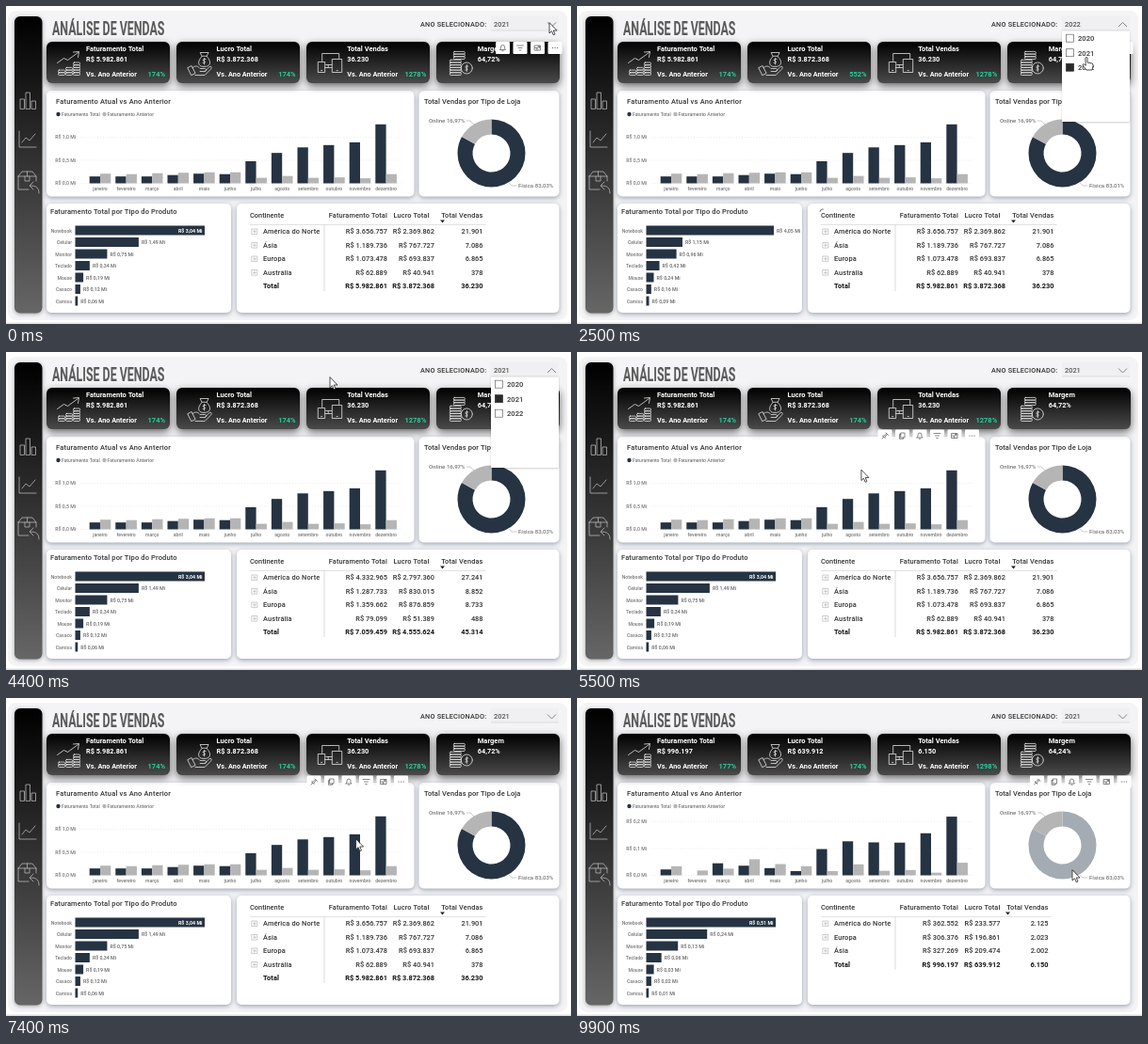
An HTML page with a canvas that plays this animation: 600 px wide and 338 px high, repeating every 10000 ms.

```html
<!DOCTYPE html>
<html lang="pt">
<head>
<meta charset="utf-8">
<title>Análise de Vendas</title>
<style>
html, body { margin: 0; width: 100%; height: 100%; overflow: hidden; background: #fff; }
canvas { display: block; width: 600px; height: 338px; }
</style>
</head>
<body>
<canvas id="stage"></canvas>
<script>
const canvas = document.getElementById('stage');
const ctx = canvas.getContext('2d');
const dpr = window.devicePixelRatio || 1;
canvas.width = 600 * dpr;
canvas.height = 338 * dpr;

const LOOP = 10000, STEP = 100;
const NAVY = '#263342', GRAY = '#b5b5b5', INK = '#333', SOFT = '#777', GREEN = '#22cf9a';
const MONTHS = ['janeiro', 'fevereiro', 'março', 'abril', 'maio', 'junho', 'julho', 'agosto',
  'setembro', 'outubro', 'novembro', 'dezembro'];
const PRODUCTS = ['Notebook', 'Celular', 'Monitor', 'Teclado', 'Mouse', 'Casaco', 'Camisa'];

const y2021 = {
  year: '2021',
  cards: ['R$ 5.982.861', 'R$ 3.872.368', '36.230', '64,72%'],
  growth: ['174%', '174%', '1278%'],
  bars: [.15, .15, .15, .18, .21, .2, .48, .66, .78, .83, .89, 1.28],
  prev: [.21, .2, .22, .23, .24, .24, .12, .16, .12, .13, .11, .2],
  unit: 49, tick: .5, ticks: 3,
  products: [3.04, 1.49, .75, .34, .19, .12, .06], reach: 137.5,
  share: [16.97, 83.03],
  cols: [405, 455, 506.5],
  rows: [
    ['América do Norte', 'R$ 3.656.757', 'R$ 2.369.862', '21.901'],
    ['Ásia', 'R$ 1.189.736', 'R$ 767.727', '7.086'],
    ['Europa', 'R$ 1.073.478', 'R$ 693.837', '6.865'],
    ['Austrália', 'R$ 62.889', 'R$ 40.941', '378'],
    ['Total', 'R$ 5.982.861', 'R$ 3.872.368', '36.230']]
};
const y2022 = {
  year: '2022',
  cards: ['R$ 7.059.459', 'R$ 4.555.624', '45.314', '64,53%'],
  growth: ['552%', '552%', '1415%'],
  bars: [.95, 1, 1.05, 1.15, 1.4, 1.5],
  prev: y2021.bars.slice(0, 6),
  unit: 42, tick: .5, ticks: 4,
  products: [4.05, 1.15, .96, .42, .24, .16, .09], reach: 135.5,
  share: [16.99, 83.01],
  cols: y2021.cols,
  rows: [
    ['América do Norte', 'R$ 4.332.965', 'R$ 2.797.360', '27.241'],
    ['Ásia', 'R$ 1.287.733', 'R$ 830.015', '8.852'],
    ['Europa', 'R$ 1.359.662', 'R$ 876.859', '8.733'],
    ['Austrália', 'R$ 79.099', 'R$ 51.389', '488'],
    ['Total', 'R$ 7.059.459', 'R$ 4.555.624', '45.314']]
};
const online = {
  year: '2021',
  cards: ['R$ 996.197', 'R$ 639.912', '6.150', '64,24%'],
  growth: ['177%', '174%', '1298%'],
  bars: [.022, 0, .045, .036, .027, .016, .098, .127, .123, .122, .157, .219],
  prev: [.034, .018, .025, .06, .042, .034, .016, .041, .017, .02, .01, .047],
  unit: 285, tick: .1, ticks: 3,
  products: [.51, .24, .125, .06, .03, .02, .01], reach: 137.5,
  share: y2021.share,
  cols: [405, 449.5, 500.5],
  rows: [
    ['América do Norte', 'R$ 362.552', 'R$ 233.577', '2.125'],
    ['Europa', 'R$ 306.376', 'R$ 196.861', '2.023'],
    ['Ásia', 'R$ 327.269', 'R$ 209.474', '2.002'],
    ['Total', 'R$ 996.197', 'R$ 639.912', '6.150']]
};

// Pointer stops: time, x, y
const POINTER = [
  [0, 577, 18], [300, 577, 18], [800, 545, 51], [1500, 543, 52], [1900, 540, 64], [2100, 540, 64],
  [2500, 541, 55], [3400, 541, 55], [3600, 541, 49], [3900, 541, 49], [4300, 344, 27],
  [4800, 344, 27], [5600, 300, 130], [6400, 273, 170], [7100, 273, 170], [7700, 470, 130],
  [8100, 500, 142], [9000, 500, 142], [9600, 526, 183], [10000, 526, 183]];

const comma = (n, d) => n.toFixed(d).replace('.', ',');

function text(s, x, y, size, o = {}) {
  ctx.font = `${o.weight || 500} ${size}px Roboto, sans-serif`;
  ctx.letterSpacing = (o.gap || 0) + 'px';
  ctx.textAlign = o.align || 'left';
  ctx.fillStyle = o.color || INK;
  ctx.fillText(s, x, y);
}

function box(x, y, w, h, r, fill, shadow) {
  ctx.save();
  if (shadow) {
    ctx.shadowColor = shadow.color;
    ctx.shadowBlur = shadow.blur * dpr;
    ctx.shadowOffsetY = shadow.dy * dpr;
  }
  ctx.fillStyle = fill;
  ctx.beginPath();
  ctx.roundRect(x, y, w, h, r);
  ctx.fill();
  ctx.restore();
}

function line(points, color, width = .7) {
  ctx.beginPath();
  points.forEach(p => ctx.lineTo(p[0], p[1]));
  ctx.strokeStyle = color;
  ctx.lineWidth = width;
  ctx.stroke();
}

function icon(d, x, y, color, width, fill) {
  ctx.save();
  ctx.translate(x, y);
  ctx.lineJoin = ctx.lineCap = 'round';
  const p = new Path2D(d);
  if (fill) { ctx.fillStyle = fill; ctx.fill(p); }
  ctx.strokeStyle = color;
  ctx.lineWidth = width;
  ctx.stroke(p);
  ctx.restore();
}

function fade(y0, y1, top, bottom) {
  const g = ctx.createLinearGradient(0, y0, 0, y1);
  g.addColorStop(0, top);
  g.addColorStop(1, bottom);
  return g;
}

// A pile of n coins standing on y
const pile = (x, y, w, n) => Array.from({ length: n }, (_, i) => {
  const top = y - 2.7 * (i + 1);
  return `M${x + 1} ${top}h${w - 2}q1 0 1 1v.7q0 1-1 1h${2 - w}q-1 0-1-1v-.7q0-1 1-1z`;
}).join('');

const SIDE_ICONS = [
  ['M1 18V8h4.500v10zM7 18V1h4.500v17zM13 18V10h4.500v8z', 14, 91],
  ['M0 0v17h18M3 12l4-5 4 3 6-7', 14, 133],
  ['M0 5l4-5h11l4 5v5M0 5v14h11M0 5h19M9.500 0v5M7 5v5h5v-5M22 23c0-6-3-8-9-8M16 11l-4 4 4 4', 13, 176]];
const CARD_ICONS = [
  'M0 13l7-5 4 2L22 2M17 1.500L23 1l-1 6' + pile(1, 26, 7, 2) + pile(9, 26, 7, 3) + pile(17, 26, 7, 5),
  'M15 6c-5 5-5 11 2 11s9-5 3-11zM15 6l-2-4h9l-2 4M19 9c-3-1-4 1.500-2 2s2 2.500-1 2M17.500 8v6.500M0 18l4-2 4 8-4 2zM5 18c4-3 6-1 8 1h5c2 0 2 3 0 3h-5M18 22l5-5c2-1 3 1 1 3l-6 6H8',
  'M4 11V3h18v5M7 18h7M10.500 15v3M8 15h6M0 12h7v11H0zM3 21h1M15 9h10v14H15zM19.500 21h1',
  pile(1, 26, 12, 6) + pile(5, 9, 12, 3) + 'M25 18.500a6 6 0 1 1-12 0a6 6 0 1 1 12 0M20.500 16.500c-3-1-4 1.500-2 2s2 2.500-1 2M19 15v7'];
const TOOLS = {
  pin: 'M1-3L3.500-.5M1.700-2.300L-1 0-2.500 0 0 2.500 0 1 2.500-1.500M-1.300 1.300L-3 3',
  copy: 'M-1.500-3H2.500V2H-1.500zM-1.500-1.500H-3V3.300H1V2',
  bell: 'M-3 2H3L2 .5V-1a2 2 0 0 0-4 0V.5zM-.7 3.200H.7',
  filter: 'M-3.500-2.500H3.500M-2 0H2M-.8 2.500H.8',
  focus: 'M-3-2.500H3V2.500H-3zM-.5.5L2-1.700M.3-1.700H2V0M-3 0H-.5V2.500',
  more: 'M-2.500 0h.1M0 0h.1M2.500 0h.1'
};

function toolbar(names, x, y) {
  names.forEach((n, i) => {
    const cx = x + i * 18.5;
    box(cx - 7.5, y - 6.5, 15, 13, 1, '#fff');
    icon(TOOLS[n], cx, y, '#555', n === 'more' ? 1.2 : .7);
  });
}

const panelShadow = { color: 'rgba(60,75,100,.5)', blur: 5, dy: 1.5 };
const panel = (x, y, w, h) => box(x, y, w, h, 5, '#fff', panelShadow);

function frame() {
  ctx.fillStyle = '#fff';
  ctx.fillRect(0, 0, 600, 338);
  box(2, 5, 594, 329, 9, '#f4f4f6');
  box(0, 336.5, 600, 1.5, 0, '#dedede');
  box(9, 11, 29.5, 315.5, 6, fade(11, 326, '#000', '#666'),
    { color: 'rgba(0,0,0,.35)', blur: 4, dy: 1 });
  SIDE_ICONS.forEach(([d, x, y]) => icon(d, x, y, '#b4b4b4', .8));
  ctx.save();
  ctx.translate(49, 31);
  ctx.scale(.62, 1);
  text('ANÁLISE DE VENDAS', 0, 0, 20, { weight: 700, color: '#5a5a5a' });
  ctx.restore();
}

function cards(d, quick) {
  const names = ['Faturamento Total', 'Lucro Total', 'Total Vendas', 'Margem'];
  names.forEach((name, i) => {
    const x = 43 + i * 138, tx = 85 + i * 138.6;
    box(x, 38, 131, 44, 6, fade(38, 82, '#000', '#4a4a4a'),
      { color: 'rgba(0,0,0,.6)', blur: 8, dy: 3 });
    icon(CARD_ICONS[i], tx - 30.5, 47.5, '#eee', .75);
    const o = { weight: 700, color: '#fff' };
    text(name, tx, 48, 7.5, o);
    text(d.cards[i], tx, 59.2, 7.3, o);
    if (i === 3) return;
    text('Vs. Ano Anterior', tx, 75, 7.3, o);
    const growth = i === 1 ? quick.growth[i] : d.growth[i];
    text(growth, tx + 84, 75, 7.5, { weight: 700, color: GREEN, align: 'right' });
  });
}

function dot(x, y, color) {
  ctx.beginPath();
  ctx.arc(x, y, 2.2, 0, 7);
  ctx.fillStyle = color;
  ctx.fill();
}

function monthChart(d) {
  const base = 188.5, slot = 331.2 / d.bars.length, w = slot * .41;
  panel(43, 90, 390.5, 112.5);
  text('Faturamento Atual vs Ano Anterior', 53, 104, 7.5, { gap: .2 });
  dot(55.5, 115, NAVY);
  text('Faturamento Total', 59, 116.8, 5, { color: SOFT });
  dot(104.5, 115, GRAY);
  text('Faturamento Anterior', 107.5, 116.8, 5.2, { color: SOFT });
  for (let i = 0; i < d.ticks; i++) {
    const y = base - i * d.tick * d.unit;
    ctx.setLineDash([1, 2]);
    line([[79, y], [421, y]], '#e3e3e3', .6);
    ctx.setLineDash([]);
    text(`R$ ${comma(i * d.tick, 1)} Mi`, 74, y + 1.8, 5.2, { color: SOFT, align: 'right' });
  }
  d.bars.forEach((v, i) => {
    const c = 86.2 + slot * (i + .5);
    box(c - w, base - v * d.unit, w, v * d.unit, 0, NAVY);
    box(c, base - d.prev[i] * d.unit, w, d.prev[i] * d.unit, 0, GRAY);
    text(MONTHS[i], c, 196.2, 5.1, { color: SOFT, align: 'center' });
  });
}

function ring(from, to, color) {
  ctx.beginPath();
  ctx.arc(515.5, 156.5, 36, from, to);
  ctx.arc(515.5, 156.5, 20, to, from, true);
  ctx.fillStyle = color;
  ctx.fill();
}

function storeChart(d, dimmed) {
  const top = -Math.PI / 2, cut = top - d.share[0] / 100 * 2 * Math.PI;
  panel(438.5, 90, 149, 112.5);
  text('Total Vendas por Tipo de Loja', 444, 104, 7.5, { gap: .1 });
  ring(top, cut + 2 * Math.PI, dimmed ? '#a5abb2' : NAVY);
  ring(cut, top, GRAY);
  text(`Online ${comma(d.share[0], 2)}%`, 449, 124, 6.1, { color: SOFT });
  text(`Física ${comma(d.share[1], 2)}%`, 544, 193.3, 6.1, { color: SOFT });
  line([[489, 122], [493, 122], [497, 126]], '#aaa', .6);
  line([[533.5, 187.5], [537, 191], [542, 191]], '#aaa', .6);
}

function productChart(d) {
  panel(43, 210, 196, 116);
  text('Faturamento Total por Tipo do Produto', 47, 221, 7.5, { gap: .13 });
  d.products.forEach((v, i) => {
    const y = 238.5 + i * 12.5, w = v / d.products[0] * d.reach;
    const label = `R$ ${comma(v, 2)} Mi`;
    text(PRODUCTS[i], 70, y + 2, 5.1, { color: SOFT, align: 'right' });
    box(73.5, y - 5, w, 10, 0, NAVY);
    if (w > 137) text(label, 208.5, y + 2, 5.3, { weight: 700, color: '#fff', align: 'right' });
    else text(label, 76.5 + w, y + 2, 5.3, { color: '#666' });
  });
}

function table(d, busy) {
  panel(245, 210, 342.5, 116);
  text('Continente', 259, 225, 7.4);
  const head = { align: 'right', gap: .12 };
  text('Faturamento Total', 405, 225, 7.4, head);
  text('Lucro Total', 449.5, 225, 7.4, head);
  text('Total Vendas', d.cols[2], 225, 7.4, head);
  const sx = d.cols[2] - 43;
  ctx.beginPath();
  ctx.moveTo(sx - 2.5, 227.5);
  ctx.lineTo(sx + 2.5, 227.5);
  ctx.lineTo(sx, 230.5);
  ctx.fillStyle = '#222';
  ctx.fill();
  const last = d.rows.length - 1;
  line([[259, 232.5], [d.cols[2] + 3, 232.5]], '#d5d5d5', .7);
  line([[338, 232.5], [338, 245 + last * 14.5]], '#ccc', .7);
  d.rows.forEach((row, i) => {
    const y = 242.3 + i * 14.5;
    const o = { weight: i === last ? 700 : 500, color: i === last ? '#111' : INK };
    if (i < last) icon('M-2.800-2.800H2.800V2.800H-2.800zM-1.500 0H1.500M0-1.500V1.500', 264, y - 2.5, '#aaa', .6);
    text(row[0], 273, y, 7.4, { ...o, gap: .13 });
    row.slice(1).forEach((v, k) => text(v, d.cols[k], y, 7.4, { ...o, align: 'right' }));
  });
  if (busy) {
    ctx.beginPath();
    ctx.arc(261, 219, 3, Math.PI, Math.PI * 1.6);
    ctx.strokeStyle = '#555';
    ctx.lineWidth = .8;
    ctx.stroke();
  }
}

function slicer(year, open) {
  text('ANO SELECIONADO:', 440, 21.5, 7.3, { gap: .2 });
  box(515, 11, 72, 15, 0, '#f0f0f2');
  line([[515, 26], [587, 26]], '#d2d2d2', .7);
  text(year, 518, 22.2, 7.4, { color: '#555' });
  const [a, b] = open ? [22, 17.5] : [17.5, 22];
  line([[575, a], [579.5, b], [584, a]], '#666', .8);
  if (!open) return;
  box(515, 26.5, 72, 96.5, 0, '#fff', { color: 'rgba(0,0,0,.2)', blur: 2, dy: .5 });
  ['2020', '2021', '2022'].forEach((y, i) => {
    const cy = 34.2 + i * 15.5, on = y === year;
    box(519.5, cy - 4, 8, 8, .5, on ? '#2a2a2a' : '#fff');
    ctx.strokeStyle = on ? '#2a2a2a' : '#666';
    ctx.lineWidth = .7;
    ctx.strokeRect(519.5, cy - 4, 8, 8);
    text(y, 532, cy + 2.8, 7.6);
  });
}

function tooltip(x, y, w, split, rows) {
  box(x, y, w, 41, 1, '#fff', { color: 'rgba(0,0,0,.4)', blur: 5, dy: 1 });
  rows.forEach(([k, v], i) => {
    const ty = y + 18.6 + i * 9.8;
    text(k, split, ty, 7.4, { align: 'right', gap: .13 });
    text(v, split + 8, ty, 7.4, { gap: .1 });
  });
}

function pointer(t, hand) {
  const i = Math.max(0, POINTER.findIndex(p => p[0] > t) - 1);
  const [t0, x0, y0] = POINTER[i], [t1, x1, y1] = POINTER[i + 1];
  const u = (t - t0) / (t1 - t0), e = u * u * (3 - 2 * u);
  const d = hand
    ? 'M-1 0q1-1.500 2 0V5l5 1q1.500.5 1 3l-1 4H0L-4 8q0-2 1.500-1L-1 8z'
    : 'M0 0V11L2.500 8.700 4.300 12.800 6 12 4.300 8H7.700z';
  icon(d, x0 + (x1 - x0) * e, y0 + (y1 - y0) * e, '#222', .8, '#fff');
}

function draw(t) {
  const pick = (from, to, click) => t >= click ? online : t >= from && t < to ? y2022 : y2021;
  const quick = pick(2400, 4100, 9100), slow = pick(2600, 4300, 9200);
  const open = t >= 300 && t < 4800;
  frame();
  monthChart(slow);
  storeChart(quick, t >= 8900);
  productChart(quick);
  table(pick(2600, 4500, 9300), t >= 2400 && t < 2600);
  cards(slow, quick);
  if (t < 4000) toolbar(['bell', 'filter', 'focus', 'more'], 527.5, 44.5);
  slicer(pick(2100, 3800, 9999).year, open);
  const tools = Object.keys(TOOLS);
  if (t >= 5500 && t < 7600) toolbar(tools, 327, 89);
  if (t >= 7600) toolbar(tools, 488.5, 89);
  if (t >= 6500 && t < 7300) {
    tooltip(270, 136.5, 132.5, 345.5, [['Inicio do Mês Mês', 'julho'], ['Faturamento Total', 'R$ 484.414']]);
  }
  if (t >= 8100 && t < 9100) {
    tooltip(374, 123, 123, 428.5, [['Tipo', 'Online'], ['Total Vendas', '6.150 (16,97%)']]);
  }
  pointer(t, t >= 400 && t < 4000);
}

function tick() {
  const t = Math.floor(performance.now() % LOOP / STEP) * STEP;
  ctx.setTransform(dpr, 0, 0, dpr, 0, 0);
  draw(t);
  requestAnimationFrame(tick);
}
tick();
</script>
</body>
</html>
```
